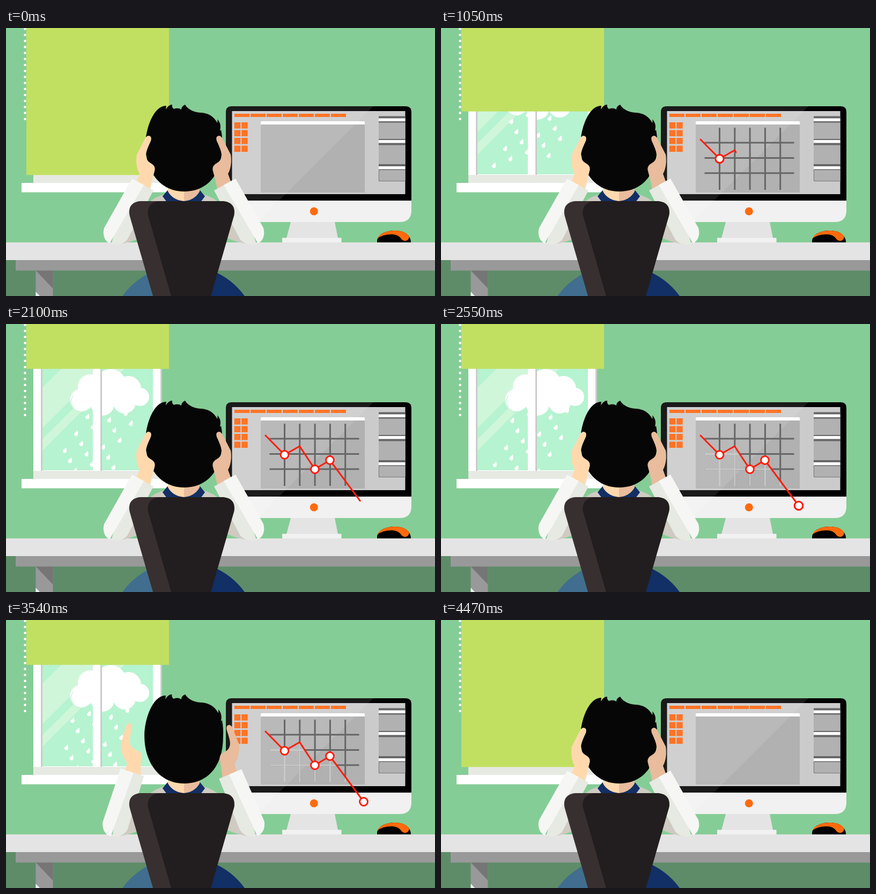
An HTML page that plays this animation: 800x500 px, repeating every 4.5 s.

```html
<!DOCTYPE html>
<html lang="en">
<head>
<meta charset="utf-8">
<title>Falling chart</title>
<style>
html, body { margin: 0; width: 100%; height: 100%; overflow: hidden; background: #85cd96; }
svg { display: block; width: 800px; height: 500px; }
</style>
</head>
<body>
<svg viewBox="0 0 800 500">
  <defs>
    <clipPath id="glass"><path d="M68 60H162V273H68ZM179 60H274V273H179Z"/></clipPath>
    <clipPath id="below"><path id="belowTrend"/></clipPath>
    <path id="drop" d="M2.5 -6C4 -2 4.4 1 3.2 3.5A3.9 3.9 0 0 1 -3.6 .8C-2.5 -2 1.2 -3 2.5 -6Z"/>
    <path id="hand" d="M241 294 249 272C243 262 242 246 244 236L260 205Q265 198 270 203Q272 207 269 213C263 226 261 232 261 238C262 250 270 251 275 256Q279 260 277 267L273 282 268 305Z"/>
    <g id="sleeve">
      <path fill="#e7e9e3" d="M235 281 275 303 226 395Q214 408 196 403Z"/>
      <path fill="#f6f7f5" d="M235 281 257 293 193 402Q178 393 183 373Z"/>
    </g>
    <g id="shoulder">
      <path fill="#cfcac2" d="M297 310Q276 315 264 328L205 404Q240 400 262 385L310 330Z"/>
      <path fill="#122f66" d="M301 303 292 314 301 326H333V318Z"/>
    </g>
  </defs>

  <!-- wall and window -->
  <path fill="#85cd96" d="M0 0H800V500H0Z"/>
  <path fill="#fff" d="M51 60H288V274H51Z"/>
  <path fill="#cbcbcb" d="M65 60h3V274h-3ZM176 60h3V274h-3ZM288 60h3V274h-3Z"/>
  <g clip-path="url(#glass)">
    <path fill="#b6f3d0" d="M60 60H280V280H60Z"/>
    <path fill="#d0f6da" d="M68 119 127 60H202L68 194ZM68 215 223 60H244L68 236Z"/>
    <g id="rain" fill="#fff"></g>
    <g fill="#fff">
      <circle cx="195" cy="113" r="29"/><circle cx="228" cy="121" r="24"/>
      <circle cx="250" cy="136" r="17"/><circle cx="157" cy="117" r="23"/>
      <circle cx="141" cy="142" r="21.5"/><circle cx="180" cy="149" r="22"/>
      <circle cx="221" cy="146" r="21"/>
    </g>
    <path fill="none" stroke="#b6f3d0" d="M126 133A18.5 18.5 0 0 0 155 157"/>
  </g>
  <path fill="#e7e9e3" d="M51 274H291V289H51Z"/>
  <path fill="#fff" d="M29 289H313V306.5H29Z"/>
  <rect id="blind" x="38" width="266" height="274" fill="#c1e062"/>
  <path stroke="#fff" stroke-width="4.6" stroke-linecap="round" stroke-dasharray="0 11.2" d="M35.5 1.8V171"/>

  <!-- desk -->
  <path fill="#5e8c69" d="M0 433H800V500H0Z"/>
  <path fill="#e4e4e4" d="M0 400H800V433H0Z"/>
  <path fill="#999" d="M18 433H800V452.5H18ZM55.5 452H87.5V500H55.5Z"/>
  <path fill="#767676" d="M55.5 452.5H87.5V486Z"/>
  <path fill="#f1f1f1" d="M55.5 492 63 500H55.5Z"/>

  <!-- computer -->
  <path fill="#e4e4e4" d="M531 362H613L619 392H523Z"/>
  <path fill="#f1f1f1" d="M515 391.5H625.5V400H515ZM410 322H756V340Q756 362 734 362H410Z"/>
  <path d="M410 322V157Q410 146 421 146H745Q756 146 756 157V322Z"/>
  <path fill="#cbcbcb" d="M421.5 155H744.5V310H421.5Z"/>
  <path fill="#b1b1b1" d="M475 179H669V307H475Z"/>
  <path fill="#fff" d="M475 180V176Q475 174 477 174H667Q669 174 669 176V180Z"/>
  <path fill="#666" d="M695 164.5H744.5V265H695Z"/>
  <path fill="#b1b1b1" d="M695 176.5H744.5V207H695ZM695 218.5H744.5V254H695ZM695 265H744.5V286H695Z"/>
  <path fill="none" stroke="#666" stroke-width=".8" d="M695.4 265V285.6H744.5"/>
  <path fill="#fff" d="M695 168.5H744.5V174H695ZM695 209H744.5V214.5H695ZM695 258H744.5V263.5H695Z"/>
  <path fill="#fff" fill-opacity=".1" d="M410 362V157Q410 146 421 146H685L469 362Z"/>
  <g fill="none" stroke="#ff7426">
    <path stroke-width="6" stroke-dasharray="28 2" d="M426 163H634"/>
    <path stroke-width="11.5" stroke-dasharray="11.5 3" d="M431.5 176V231M445 176V231"/>
  </g>
  <circle cx="574.3" cy="342" r="7.5" fill="#ff6a0c"/>
  <path d="M692 400C691 386 706 378 725 378C744 378 755 387 755 400Z"/>
  <path fill="#ff6a0c" d="M692 393C698 382 711 378 725 378C740 378 751 384 752 390Q750 398 743 397Q738 396 736 392Q732 386 721 385Q704 384 692 393Z"/>

  <!-- chart -->
  <g id="chart" fill="none" stroke-width="3">
    <g id="grid" stroke="#666"></g>
    <g id="paleGrid" stroke="#c9c9c9" clip-path="url(#below)"></g>
    <path id="trend" stroke="#fb1e0c" stroke-linecap="round"/>
    <g id="dots" fill="#fff" stroke="#fb1e0c"></g>
  </g>

  <!-- person -->
  <path fill="#416e8e" d="M217 500A141 141 0 0 1 274 454V500Z"/>
  <path fill="#122f66" d="M380 500V451A141 141 0 0 1 445 500Z"/>
  <use href="#shoulder"/>
  <use href="#shoulder" transform="matrix(-1 0 0 1 663 0)"/>
  <path fill="#ffd9ad" d="M302 290H332V323Q311 321 302 305Z"/>
  <path fill="#e8bc9c" d="M332 290H361V305Q352 321 332 323Z"/>
  <path id="head" fill="#060606" d="M260 218C260 190 274 145 299 145L298 152Q303 143 310 143Q309 148 313 151Q321 148 327 152Q327 146 334 143C339 152 352 158 365 158Q385 160 394 177Q395 172 394 170Q400 176 400 185L399 192 401 190C404 205 403 215 403 220C403 270 378 305 332 305C287 305 260 267 260 218Z"/>
  <g id="leftArm"><use href="#hand" fill="#ffd9ad"/><use href="#sleeve"/></g>
  <g transform="matrix(-1 0 0 1 663 0)">
    <g id="rightArm"><use href="#hand" fill="#e8bc9c"/><use href="#sleeve"/></g>
  </g>
  <path fill="#383030" d="M250 323H330V500H274L230.5 350Q226 326 250 323Z"/>
  <path fill="#221d1e" d="M284 323H406Q429 326 425.5 349L382 500H308L265 350Q261 328 284 323Z"/>
</svg>
<script>
const LOOP = 4500;
const $ = id => document.getElementById(id);
const span = (t, from, to) => Math.min(1, Math.max(0, (t - from) / (to - from)));
const easeQuad = x => x < .5 ? 2 * x * x : 1 - 2 * (1 - x) ** 2;
const easeCubic = x => x < .5 ? 4 * x ** 3 : 1 - 4 * (1 - x) ** 3;
const backOut = (x, s) => 1 + (s + 1) * (x - 1) ** 3 + s * (x - 1) ** 2;
const pulse = (t, a, b, c) => easeQuad(span(t, a, b)) - easeQuad(span(t, b, c));

function add(parent, tag, attrs) {
  const el = document.createElementNS('http://www.w3.org/2000/svg', tag);
  for (const key in attrs) el.setAttribute(key, attrs[key]);
  return $(parent).appendChild(el);
}

// Drops leave the cloud at a steady rate, spread by the golden ratio
const drops = Array.from({ length: 46 }, (_, i) => ({
  x: 132 + i * .618 % 1 * 112,
  start: -600 + i * 108,
  el: add('rain', 'use', { href: '#drop' })
}));

// Grid lines grow from their centres
const lines = [];
for (const parent of ['grid', 'paleGrid']) {
  for (let i = 0; i < 5; i++)
    lines.push({ el: add(parent, 'path'), x: 519.5 + i * 28.3, delay: 40 + i * 50 });
  for (let i = 0; i < 3; i++)
    lines.push({ el: add(parent, 'path'), y: 214 + i * 28.4, delay: 60 + i * 80 });
}

const SPEED = .166, TREND_START = 525;
const points = [[484, 208], [519.5, 244], [547.5, 228], [576, 271], [604, 254], [667, 339]];
$('trend').setAttribute('d', 'M' + points.join(' '));
$('belowTrend').setAttribute('d', `M${points.join(' ')}H484Z`);

// Each dot pops up once the line has passed it; the first peak has none
let trendLength = 0;
const dots = [];
for (let i = 1; i < points.length; i++) {
  const [x, y] = points[i], [px, py] = points[i - 1];
  trendLength += Math.hypot(x - px, y - py);
  if (i !== 2)
    dots.push({ x, y, start: TREND_START + trendLength / SPEED + 50, el: add('dots', 'circle', { r: 7.4 }) });
}

function drawRain(t) {
  for (const { x, start, el } of drops) {
    const fall = (t - start) * .0585;
    el.setAttribute('transform', `translate(${x - fall * .35} ${160 + fall})`);
    el.style.display = fall > -25 && fall < 130 ? '' : 'none';
  }
}

function drawChart(t) {
  $('chart').style.opacity = 1 - span(t, 4230, 4450);
  for (const { el, x, y, delay } of lines) {
    const p = span(t, delay, delay + 450);
    const half = (x ? 58 : 83.5) * (p && backOut(p, 1.15));
    el.setAttribute('d', x ? `M${x} ${244 - half}V${244 + half}` : `M${575 - half} ${y}H${575 + half}`);
  }
  $('paleGrid').style.opacity = span(t, 2200, 2450);

  const drawn = Math.min(trendLength, (t - TREND_START) * SPEED);
  $('trend').style.display = drawn > 0 ? '' : 'none';
  $('trend').setAttribute('stroke-dasharray', `${Math.max(0, drawn)} 999`);
  for (const { el, x, y, start } of dots) {
    const p = span(t, start, start + 420);
    el.setAttribute('transform', `translate(${x} ${y}) scale(${p && backOut(p, 1.7)})`);
  }
}

function drawPerson(t) {
  const arms = pulse(t, 3190, 3420, 3920);
  $('leftArm').setAttribute('transform', `rotate(${-12.4 * arms} 205 390)`);
  $('rightArm').setAttribute('transform', `rotate(${-6.6 * arms} 205 390)`);
  const size = 1 + .07 * pulse(t, 3240, 3400, 3650);
  $('head').setAttribute('transform', `translate(331.5 305) scale(${size}) translate(-331.5 -305)`);
}

function draw(t) {
  const open = easeCubic(span(t, 697, 1347)) - easeCubic(span(t, 4135, 4475));
  $('blind').setAttribute('height', 274.3 - 190.6 * open);
  drawRain(t);
  drawChart(t);
  drawPerson(t);
}

const began = performance.now();
function frame() {
  draw((performance.now() - began) % LOOP);
  requestAnimationFrame(frame);
}
frame();
</script>
</body>
</html>
```
